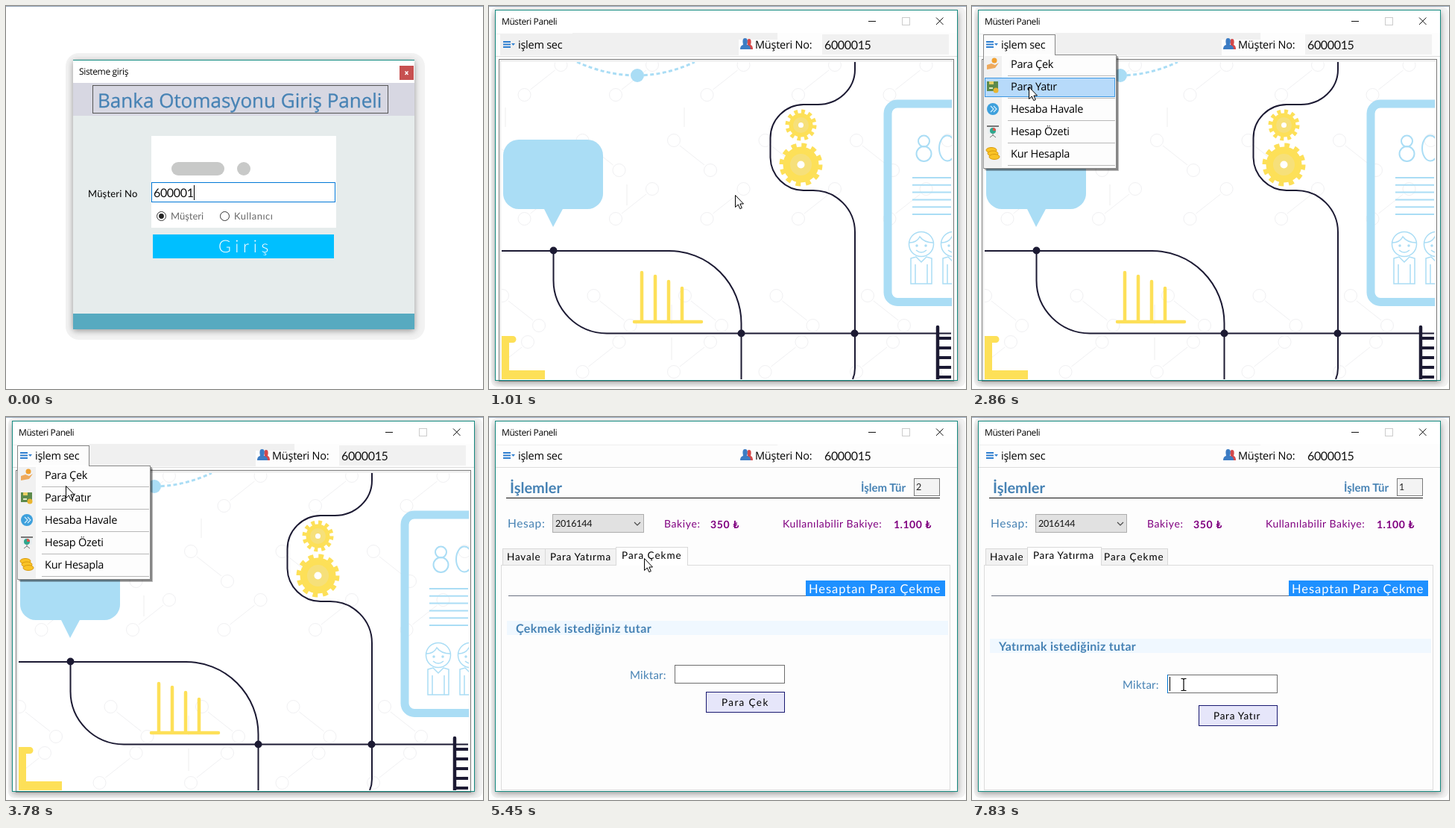
Write an HTML page that moves like this. It is 640 px wide and 513 px high and loops after 8 s.

```html
<!DOCTYPE html>
<html lang="tr">
<head>
<meta charset="utf-8">
<title>Banka Otomasyonu</title>
<style>
html,body{margin:0;width:100%;height:100%;overflow:hidden;background:#fff}
svg{display:block;width:100vw;height:100vh}
text{white-space:pre;text-rendering:geometricPrecision}
.ui{font-family:"Open Sans","Noto Sans",sans-serif}
.geo{font-family:Lato,"DejaVu Sans",sans-serif}
</style>
</head>
<body>
<svg id="stage" viewBox="0 0 640 513" xmlns="http://www.w3.org/2000/svg"></svg>
<script>
const LOOP = 8000;
const STEEL = '#4682b4', PURPLE = '#800080', SKY = '#aaddf5', SUN = '#fde058', INK = '#1c1a33';

const range = (n, f) => Array.from({length: n}, (_, i) => f(i)).join('');
const label = (font, x, y, s, size, gap, fill, weight = 400, id = '') =>
  `<text ${id && `id="${id}"`} class="${font}" x="${x}" y="${y}" font-size="${size}" letter-spacing="${gap}" fill="${fill}" font-weight="${weight}">${s}</text>`;
const ui = (...a) => label('ui', ...a);
const geo = (...a) => label('geo', ...a);
const rect = (x, y, w, h, fill, more = '') =>
  `<rect x="${x}" y="${y}" width="${w}" height="${h}" fill="${fill}" ${more}/>`;
// box with a crisp one pixel border, given by its outer corners
const box = (x1, y1, x2, y2, fill, line, more = '') =>
  rect(x1 + .5, y1 + .5, x2 - x1 - 1, y2 - y1 - 1, fill, `stroke="${line}" ${more}`);
const path = (d, stroke, width = 1, more = '') =>
  `<path d="${d}" fill="none" stroke="${stroke}" stroke-width="${width}" ${more}/>`;
const dot = (x, y, r, fill, more = '') => `<circle cx="${x}" cy="${y}" r="${r}" fill="${fill}" ${more}/>`;
const group = (id, body, more = '') => `<g id="${id}" ${more}>${body}</g>`;

function login() {
  return rect(80, 63, 482, 384, '#f2f2f2', 'rx="18"') +
    rect(90, 74, 458, 361, '#777', 'filter="url(#blur)" opacity=".75"') +
    rect(90, 72, 458, 361, '#fff') + rect(90, 72, 458, 1, '#128a80', 'id="loginEdge"') +
    ui(98, 92, 'Sisteme giriş', 12, -.35, '#000', 400, 'loginTitle') +
    rect(528, 80, 19, 19, '#c75050', 'id="loginClose"') +
    path('M535.5 87.5l4 4.5M539.5 87.5l-4 4.5', '#fff', 1.4) +
    rect(90, 103, 458, 44, '#d7d7e2') + rect(90, 147, 458, 265, '#e6ecec') + rect(90, 412, 458, 21, '#57aac0') +
    box(116, 106, 513, 144, 'none', '#555') +
    ui(123, 136, 'Banka Otomasyonu Giriş Paneli', 26, 0, STEEL, 400, 'heading') +
    rect(195, 174, 248, 123, '#fff') +
    rect(222, 209, 71, 18, '#c8c9c8', 'rx="9"') + dot(319, 218, 9, '#c8c9c8') +
    box(195, 236, 442, 263, '#fff', '#0078d7', 'id="loginField"') +
    geo(198, 256, '', 16, -.35, '#111', 400, 'digits') + rect(252, 240, 1, 20, '#000', 'id="loginCaret"') +
    geo(110, 256, 'Müşteri No', 13, .2, '#000') +
    dot(208.5, 281.5, 6, '#fff', 'stroke="#333"') + dot(208.5, 281.5, 3.4, '#222') +
    geo(221, 286, 'Müşteri', 13, 0, '#696969') +
    dot(293.5, 281.5, 6, '#fff', 'stroke="#333"') + geo(306, 286, 'Kullanıcı', 13, .5, '#696969') +
    rect(197, 306, 243, 32, '#00bfff') + geo(285, 330, 'Giriş', 23, 5.6, '#fff', 300);
}

function pattern() {
  const pair = (x, y, d) => dot(x, y, 8.5, 'none') + dot(x + 49, y + 40 * d, 8.5, 'none') +
    `<path d="M${x + 8} ${y + 7 * d}L${x + 41} ${y + 33 * d}"/>`;
  const row = (y, x0, d) => range(7, j => pair(x0 + 122.5 * j, y, d));
  return `<g stroke="#f0f0f2" fill="none">` +
    row(119, -75, -1) + row(180, 3, 1) + row(285, -75, -1) + row(388, 18, 1) + row(490, 3, -1) +
    path('M22 136v26M262 136v26M185 239v28M245 400v26M245 444v30', '#eee') + '</g>';
}

function gear(x, y, r, hole) {
  const ring = r - 3, tooth = 2 * Math.PI * ring / 24;
  return dot(x, y, r - 5, SUN) +
    dot(x, y, ring, 'none', `stroke="${SUN}" stroke-width="6" stroke-dasharray="${tooth}"`) +
    dot(x, y, r * .5, '#f6e07a') + dot(x, y, hole, '#fff');
}

function person(x) {
  return dot(x, 319, 16.5, 'none') +
    `<path d="M${x - 16} 317q10 0 14-8q6 8 18 8M${x - 7} 327q7 6 14 0M${x - 14} 338l7-2l7 7l7-7l7 2v34h-28zM${x - 8} 346v26M${x + 8} 346v26"/>` +
    dot(x - 6, 321, 1, SKY) + dot(x + 6, 321, 1, SKY);
}

function picture() {
  return pattern() +
    path('M118 75Q199 111 276 75', SKY, 3, 'stroke-dasharray="5 3.4"') + dot(199, 93, 9, SKY) +
    rect(19, 179, 134, 93, SKY, 'rx="21"') + `<path d="M73 270h27l-14 26z" fill="${SKY}"/>` +
    path('M17 328H241A97 97 0 0 1 338.500 425V500M86.500 328V367A72 71 0 0 0 158 438.500H601', INK, 2) +
    path('M601 438.500H620', INK, 2) +
    path('M491 74V85A50 47 0 0 1 441 132H422A45 45 0 0 0 377.500 177V203A45 45 0 0 0 422 247H435A56 56 0 0 1 491 303V485q0 8-3 15', INK, 2) +
    dot(86.5, 327.5, 5, INK) + dot(338.5, 438.5, 5, INK) + dot(490.5, 438.5, 5, INK) +
    gear(418.5, 159.5, 21, 3.5) + gear(418.5, 212.5, 29, 5) +
    path('M205 357V422M223 362V422M241 369V422M259 378V422M195 423H285', SUN, 4.5, 'stroke-linecap="round"') +
    rect(535, 131, 140, 265.5, 'none', `rx="13" stroke="${SKY}" stroke-width="11"`) +
    `<g fill="none" stroke="${SKY}" stroke-width="2">` +
    dot(583.5, 181, 7.5, 'none') + dot(583.5, 198, 10, 'none') +
    '<ellipse cx="615" cy="190.5" rx="11" ry="17"/>' +
    range(6, i => `<path d="M568 ${230 + i * 9.8}H620"/>`) +
    '<g stroke-width="1.5">' + person(580) + person(623) + '</g></g>' +
    path('M602 430V500', INK, 4.5, 'stroke-linecap="round"') +
    range(5, i => path(`M602 ${445 + i * 13}H620`, INK, 4)) +
    `<path d="M17 442H32a4.500 4.500 0 0 1 0 9H27V488H75V500H17z" fill="${SUN}"/>`;
}

function frame() {
  return rect(3, 1, 636, 509, '#f3f3f3', 'rx="8"') +
    rect(9, 9, 620, 495, '#666', 'filter="url(#blur)" opacity=".7"') +
    box(8, 5, 629, 502, '#fdfdfd', '#14897f') + rect(9, 6, 619, 30, '#fff') +
    ui(17, 25, 'Müsteri Paneli', 12, -.42, '#000') +
    path('M509 20.500H519M600 15.500l9.500 9.500M609.500 15.500l-9.500 9.500', '#111') +
    box(554, 15, 565, 26, 'none', '#ccc');
}

function toolbar() {
  return group('grayBar', rect(15, 38, 320, 28, '#f0f0f0') + rect(112, 36, 275, 9, '#f0f0f0') + rect(447, 38, 170, 27, '#f1f1f1')) +
    path('M9 37.500H387', '#f0f0f0') + path('M9 67.500H628', '#dcdcdc') +
    box(15, 38, 112, 66, 'none', 'none', 'id="menuButton"') +
    path('M19 48H29M19 51.500H29M19 55H29', '#2f7fd0', 2) + '<path d="M30 50h5l-2.500 3z" fill="#2f7fd0"/>' +
    ui(39, 57, 'işlem sec', 14.5, -.25, '#000') +
    '<path d="M343 58q0-5 4-6q-2-8 2-8q4 0 2 8q3 1 3 6z" fill="#d4494a"/><path d="M337 58q0-5 4-6q-2-9 2.500-9q5 0 2.500 9q5 1 5 6z" fill="#3c7cc4"/>' +
    ui(357, 57, 'Müşteri No:', 14.5, -.25, '#000') + geo(450, 58, '6000015', 16, -.35, '#111');
}

const MENU = ['Para Çek', 'Para Yatır', 'Hesaba Havale', 'Hesap Özeti', 'Kur Hesapla'];
const ICONS = [
  dot(30, 73, 3.500, '#f0a030') + '<path d="M20 79l6-2l5 2l5-3l-5 7l-11 2z" fill="#eea95c"/>',
  rect(20, 101, 15, 13, '#5c8a4c') + rect(23, 101, 6, 4, '#e6cf62') + dot(32, 113, 3.500, '#e8b530') + rect(23, 109, 5, 2, '#dde8c8'),
  dot(28, 138, 8, '#3ea0dc') + path('M25 134l4 4l-4 4M29 134l4 4l-4 4', '#d8f0ff', 1.200),
  rect(20, 160, 16, 2, '#777') + rect(21, 162, 14, 9, '#e9eef0') + dot(28, 167, 4, '#2fa68c') + '<path d="M28 167v-4a4 4 0 0 1 4 4z" fill="#e0544a"/>' + path('M28 171v2l-4 3M28 173l4 3', '#777'),
  range(3, i => `<ellipse cx="${26 + i * 2}" cy="${193 + i * 4.500}" rx="7" ry="3.500" fill="#f9c326" stroke="#d99a10"/>`)
];

function menu() {
  return rect(19, 69, 178, 152, '#000', 'opacity=".25"') + rect(17, 67, 179, 153, '#000', 'opacity=".3"') +
    box(15, 65, 194, 218, '#fdfdfd', '#888') + rect(17, 67, 23, 149, '#f1f1f1') +
    rect(16, 65, 95, 1, '#fff') +
    box(17, 66, 192, 92, '#b7dafa', '#3c96e0', 'id="hot"') +
    MENU.map((s, i) => ICONS[i] + ui(52, 83 + 30 * i, s, 14.5, -.25, '#000') +
      path(`M48 ${93.5 + 30 * i}H192`, '#b8b8b8')).join('');
}

const TABS = [
  {id: 'deposit', x: 262, y: 345, head: 'Yatırmak istediğiniz tutar', gap: .27, base: 313, act: 'Para Yatır', actX: 324, actGap: .75, btn: 386},
  {id: 'draw', x: 249, y: 332, head: 'Çekmek istediğiniz tutar', gap: .4, base: 289, act: 'Para Çek', actX: 312, actGap: 1.4, btn: 368}
];

function tabPage(p) {
  const b = p.x + 42;
  return group(p.id,
    rect(24, p.base - 16, 592, 19, '#f0f8ff', 'class="band"') +
    geo(36, p.base, p.head, 16, p.gap, STEEL, 700) +
    geo(p.x - 60, p.y + 19, 'Miktar:', 15, .25, STEEL) +
    box(p.x, p.y, p.x + 148, p.y + 25, '#fff', '#6e6e6e', `id="${p.id}Field"`) +
    box(b, p.btn, b + 106, p.btn + 28, '#e6e6fa', '#191970') +
    geo(p.actX, p.btn + 19, p.act, 13.5, p.actGap, '#000'));
}

function form() {
  const tab = (x1, x2, top, fill) => box(x1, top, x2, 199, fill, '#d9d9d9');
  const open = (x1, x2) => tab(x1, x2, 174, '#fff') + rect(x1 + 1, 198, x2 - x1 - 2, 1, '#fff');
  const name = (x, y, s, gap) => geo(x, y, s, 13.5, gap, '#000');
  return rect(9, 68, 619, 433, '#fdfdfd') +
    geo(28, 102, 'İşlemler', 20, 0, STEEL, 700) + geo(499, 100, 'İşlem Tür', 15, 0, STEEL, 700) +
    box(570, 82, 605, 106, '#fff', '#7a7a7a', 'id="kindBox"') + geo(573, 98, '1', 12.5, 0, '#222', 400, 'kind') +
    path('M23 108.500H605', '#111') +
    geo(25, 148, 'Hesap:', 15.5, .6, STEEL) +
    box(85, 130, 208, 155, '#e1e1e1', '#adadad') + geo(89, 147, '2016144', 12.5, -.2, '#111') +
    path('M195 141l4 4l4-4', '#444', 1.1) +
    geo(235, 148, 'Bakiye:', 14, .6, PURPLE) + geo(297, 149, '350 ₺', 14, .6, PURPLE, 700) +
    geo(394, 148, 'Kullanılabilir Bakiye:', 14, .5, PURPLE) + geo(543, 149, '1.100 ₺', 14, .5, PURPLE, 700) +
    box(16, 198, 619, 500, '#fdfdfd', '#dcdcdc') +
    tab(18, 76, 176, '#f2f2f2') + name(24, 192, 'Havale', .8) +
    group('tabDeposit', tab(173, 263, 176, '#f2f2f2') + open(74, 174) + name(82, 190, 'Para Yatırma', .7) + name(177, 192, 'Para Çekme', 1)) +
    group('tabDraw', tab(75, 171, 176, '#f2f2f2') + open(170, 267) + name(82, 192, 'Para Yatırma', .7) + name(178, 190, 'Para Çekme', 1)) +
    path('M26 239.500H425', '#6a7080') + rect(425, 219, 187, 21, '#1e90ff') +
    geo(429, 236, 'Hesaptan Para Çekme', 16.5, .95, '#fff') +
    TABS.map(tabPage).join('') +
    group('caret', rect(262, 345, 1, 25, '#0078d7') + rect(265, 348, 1, 19, '#000'));
}

const stage = document.getElementById('stage');
stage.innerHTML =
  `<defs><filter id="blur" x="-10%" y="-10%" width="120%" height="120%"><feGaussianBlur stdDeviation="4"/></filter>
  <clipPath id="view"><rect x="17" y="75" width="604" height="425"/></clipPath></defs>` +
  rect(0, 0, 640, 513, '#fff') + group('login', login()) +
  group('panel', frame() + group('tools', toolbar()) +
    group('home', box(13, 71, 624, 503, '#fff', '#777') + path('M15.500 501V73.500H622', '#ddd') +
      `<g clip-path="url(#view)">${picture()}</g>` + rect(8, 501, 621, 1, '#14897f')) +
    group('form', form()) + group('menu', menu())) +
  rect(0, 0, 640, 1, '#93a5b8') +
  group('arrow', '<path d="M.500.500V16.500L4.300 13L6.800 18.600L9.300 17.500L6.900 12H11.500z" fill="#fff" stroke="#000" stroke-linejoin="round"/>') +
  group('beam', path('M-3.500-7.500H-1L0-6.500L1-7.500H3.500M-3.500 8.500H-1L0 7.500L1 8.500H3.500M0-6.500V7.500', '#000', 1.200));

const el = {};
stage.querySelectorAll('[id]').forEach(n => el[n.id] = n);
const bands = stage.querySelectorAll('.band');
const show = (n, on) => n.setAttribute('display', on ? 'inline' : 'none');
const attr = (n, k, v) => n.setAttribute(k, v);
attr(el.heading, 'stroke', STEEL);
attr(el.heading, 'stroke-width', .3);

// pointer path: time, x, y
const POINTER = [
  [740, 330, 253], [1440, 0, 369], [1560, 16, 321], [1710, 30, 190], [1830, 46, 92], [1950, 58, 48], [2100, 60, 40],
  [2620, 66, 72], [2740, 72, 88], [2860, 76, 108], [3010, 80, 140], [3140, 84, 183],
  [3410, 84, 165], [3530, 83, 140], [3660, 82, 108], [3780, 80, 92], [3920, 80, 80],
  [4070, 82, 86], [4190, 84, 95], [4320, 86, 104], [4580, 102, 122], [4700, 125, 140], [4820, 155, 163], [4940, 180, 179],
  [5090, 198, 186], [5210, 208, 189], [5840, 226, 235], [5960, 246, 295], [6120, 264, 345], [6270, 267, 344], [6430, 269, 335],
  [6570, 240, 300], [6690, 200, 240], [6810, 153, 186], [7080, 175, 225], [7200, 215, 285], [7330, 252, 333],
  [7450, 270, 352], [7590, 276, 350], [7710, 281, 355], [7830, 284, 358]
];

function draw(t) {
  const within = (a, b) => t >= a && t < b;
  const [, x, y] = POINTER.filter(p => p[0] <= t).pop() || [0, -50, -50];

  // login window
  const typed = t >= 160, idle = t >= 740;
  show(el.login, t < 1010);
  el.digits.textContent = typed ? '6000015' : '600001';
  attr(el.loginCaret, 'x', typed ? 261 : 252);
  attr(el.loginField, 'stroke', idle ? '#111' : '#0078d7');
  attr(el.loginClose, 'fill', idle ? '#bcbcbc' : '#c75050');
  attr(el.loginTitle, 'fill', idle ? '#777' : '#000');
  attr(el.loginEdge, 'fill', idle ? '#aaa' : '#128a80');

  // customer window opening
  const [scale, alpha] = t < 860 ? [.961, .2] : t < 1010 ? [.992, .78] : [1, 1];
  show(el.panel, t >= 740);
  attr(el.panel, 'opacity', alpha);
  attr(el.panel, 'transform', `translate(320 253) scale(${scale}) translate(-320 -253)`);
  show(el.tools, t >= 1010);

  // menu
  const open = within(2220, 4580), hover = within(1950, 2220);
  attr(el.menuButton, 'fill', hover ? '#b7dafa' : open ? '#fcfcfc' : 'none');
  attr(el.menuButton, 'stroke', hover ? '#3c96e0' : open ? '#888' : 'none');
  show(el.menu, open);
  const item = Math.floor((y - 66) / 30);
  show(el.hot, item >= 0 && (y - 66) % 30 < 26);
  attr(el.hot, 'y', 66.5 + 30 * Math.max(item, 0));

  // transaction form
  const inForm = t >= 4580, drawing = within(5330, 6930), settled = t >= 4700;
  show(el.home, !inForm);
  show(el.grayBar, !inForm);
  show(el.form, inForm);
  for (const id of ['draw', 'tabDraw']) show(el[id], drawing);
  for (const id of ['deposit', 'tabDeposit']) show(el[id], !drawing);
  bands.forEach(b => show(b, settled));
  el.kind.textContent = drawing ? '2' : '1';
  attr(el.kindBox, 'fill', settled ? '#f3f3f3' : '#fff');
  attr(el.drawField, 'stroke', within(6120, 6570) ? '#111' : '#6e6e6e');
  attr(el.depositField, 'stroke', within(7450, 7710) ? '#111' : '#6e6e6e');
  show(el.caret, t >= 7710);

  const beam = within(6120, 6570) || t >= 7450;
  show(el.arrow, !beam);
  show(el.beam, beam);
  attr(beam ? el.beam : el.arrow, 'transform', `translate(${x} ${y})`);
}

const start = performance.now();
function tick() {
  draw((performance.now() - start) % LOOP);
  requestAnimationFrame(tick);
}
tick();
</script>
</body>
</html>
```
